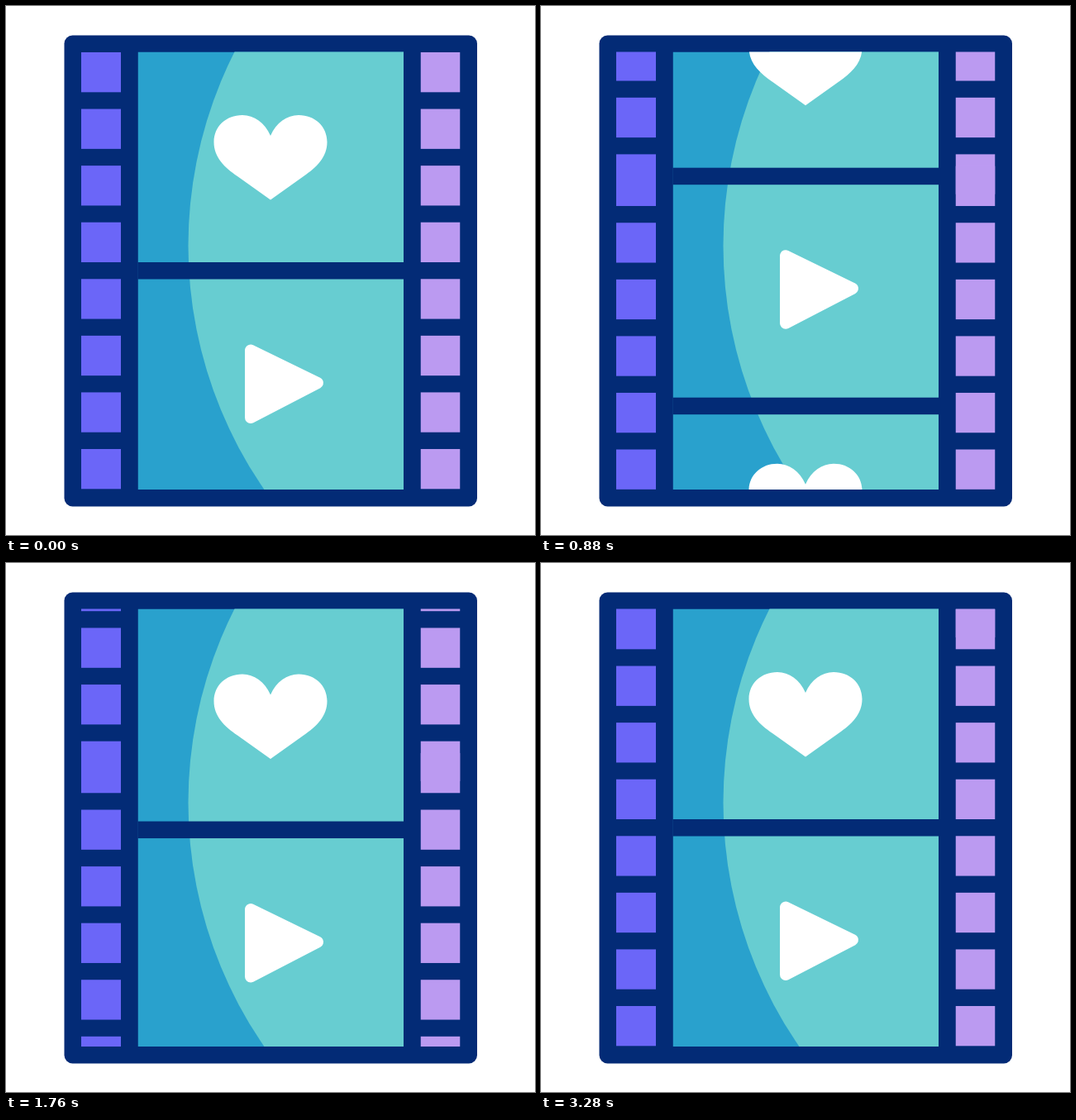
These frames come from a looping animation (640x640 px, 3.4 s). An HTML page with a canvas:

```html
<!DOCTYPE html>
<html>
<head>
<meta charset="utf-8">
<style>
html, body { margin: 0; width: 100%; height: 100%; overflow: hidden; background: #fff; }
canvas { display: block; }
</style>
</head>
<body>
<canvas id="stage" width="640" height="640"></canvas>
<script>
const ctx = document.getElementById('stage').getContext('2d');
const LOOP = 3400;
const NAVY = '#032b76';
const TOP = 55.5, BOTTOM = 585;
const PITCH = 68.57;

const heart = new Path2D(
  'M320 157C313 141 300 132 286 132C266 132 251.5 146 251.5 164.5' +
  'C251.5 183 264 195 280 206L320 234.5L360 206C376 195 388.5 183 388.5 164.5' +
  'C388.5 146 374 132 354 132C340 132 327 141 320 157Z');
const play = new Path2D('M296 416.5V498L377 456Z');

// Scroll offsets of the repeated film sections; holes run on their own track.
const sections = [0, 600, 1136, 1712];
const holeRuns = [[0, 10], [628, 4], [848, 18], [2028, 8]];

// Eased start, steady run through [time, distance] points, eased stop.
function scroll(t, points, end, power) {
  const [firstT, firstD] = points[0];
  if (t < firstT) return firstD * Math.max(0, (t - 15) / (firstT - 15)) ** 3;
  for (let i = 1; i < points.length; i++) {
    const [t0, d0] = points[i - 1], [t1, d1] = points[i];
    if (t < t1) return d0 + (d1 - d0) * (t - t0) / (t1 - t0);
  }
  const [lastT, lastD] = points[points.length - 1];
  const left = Math.max(0, (end[0] - t) / (end[0] - lastT));
  return end[1] - (end[1] - lastD) * left ** power;
}

const filmScroll = t =>
  scroll(t, [[560, 259], [880, 713], [1200, 1130], [1480, 1534]], [1851, 1712], 3);
const holeScroll = t =>
  scroll(t, [[560, 267], [880, 709], [1200, 1134], [1480, 1527], [1515, 1576]], [2163, 2028], 2);

function pulse(t, start) {
  const u = Math.min(1, Math.max(0, (t - start) / 640));
  return 1 - 0.115 * (1 - Math.cos(2 * Math.PI * u));
}

function box(color, x, y, w, h) {
  ctx.fillStyle = color;
  ctx.fillRect(x, y, w, h);
}

function clipped(x, w, paint) {
  ctx.save();
  ctx.beginPath();
  ctx.rect(x, TOP, w, BOTTOM - TOP);
  ctx.clip();
  paint();
  ctx.restore();
}

function icon(path, cx, cy, scale, stroke) {
  ctx.save();
  ctx.translate(cx, cy);
  ctx.scale(scale, scale);
  ctx.translate(-cx, -cy);
  ctx.fillStyle = ctx.strokeStyle = '#fff';
  ctx.fill(path);
  if (stroke) {
    ctx.lineWidth = stroke;
    ctx.lineJoin = 'round';
    ctx.stroke(path);
  }
  ctx.restore();
}

function drawFilm(t) {
  box('#29a1cd', 159.5, TOP, 321.5, BOTTOM - TOP);
  ctx.fillStyle = '#67cdd1';
  ctx.beginPath();
  ctx.arc(740, 290, 519.5, 0, 2 * Math.PI);
  ctx.fill();

  const moved = filmScroll(t);
  for (const start of sections) {
    ctx.save();
    ctx.translate(0, start - moved);
    box(NAVY, 159, 310, 323, 20.5);
    box(NAVY, 159, 588, 323, 20.5);
    icon(heart, 320, 183, pulse(t, 1980));
    icon(play, 336.5, 457, pulse(t, 2640), 14);
    ctx.restore();
  }
}

function drawHoles(t, x, color) {
  const moved = holeScroll(t);
  for (const [start, count] of holeRuns)
    for (let i = 0; i < count; i++)
      box(color, x, 56 + start + i * PITCH - moved, 48, 48.3);
}

function draw(t) {
  box('#fff', 0, 0, 640, 640);
  ctx.fillStyle = NAVY;
  ctx.beginPath();
  ctx.roundRect(70.5, 35.5, 499.5, 570, 10);
  ctx.fill();
  clipped(159.5, 321.5, () => drawFilm(t));
  clipped(91, 48, () => drawHoles(t, 91, '#6b66f8'));
  clipped(501.5, 48, () => drawHoles(t, 501.5, '#bb9af1'));
}

const began = performance.now();
function tick() {
  draw((performance.now() - began) % LOOP);
  requestAnimationFrame(tick);
}
tick();
</script>
</body>
</html>
```
